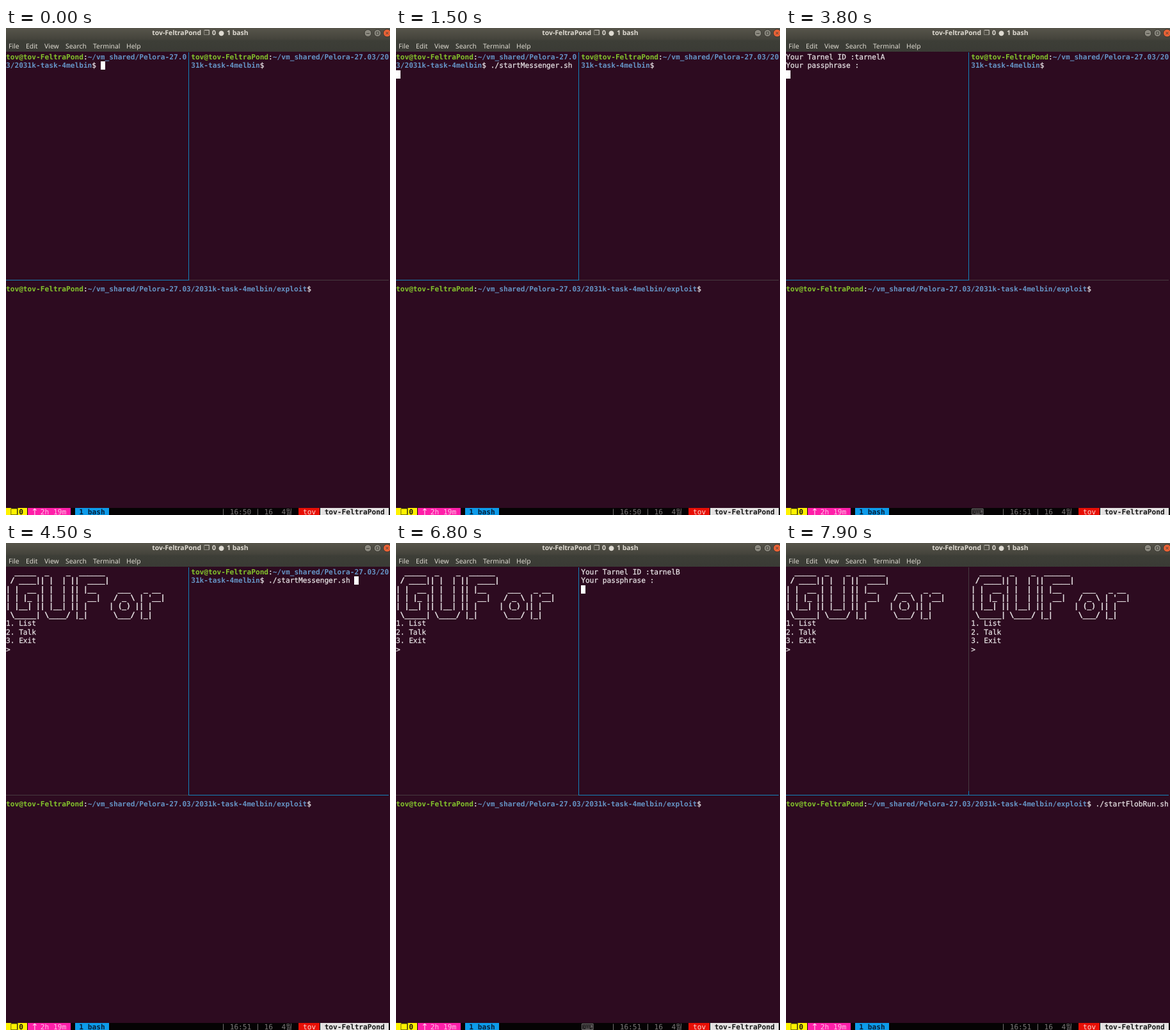
Recreate the animation shown at these times as an HTML page. Size 600x760 px, loop 8 s.

```html
<!DOCTYPE html>
<html lang="en">
<head>
<meta charset="utf-8">
<title>Terminal session</title>
<style>
  :root { --cw: 6.725px; --lh: 13.42px; --blue: #1482ba; --dim: #473a40; }
  html, body { margin: 0; width: 600px; height: 760px; overflow: hidden; }
  body {
    position: relative; background: #2d0b20; color: #e9e5e7;
    font: 11.17px/var(--lh) "DejaVu Sans Mono", "Noto Sans CJK KR", "DejaVu Sans", monospace;
    text-rendering: geometricPrecision;
  }
  body > *, #bar > *, #status > * { position: absolute; }
  #bar {
    left: 0; top: 0; width: 600px; height: 37px; color: #dfdbd2;
    background: linear-gradient(#57554b, #45443c 17px, #3d3e37 20px, #3a3b35);
    font: 10.4px/16px "Noto Sans", "DejaVu Sans", sans-serif; white-space: pre;
  }
  #bar > span { top: 21px; }
  #bar > b { top: 0; line-height: 17px; }
  #bar svg { left: 556px; top: 0; }
  .pane { white-space: break-spaces; line-break: anywhere; -webkit-text-stroke: .25px; }
  #left { left: 0; top: 38.8px; width: calc(42.2 * var(--cw)); }
  #right { left: calc(43 * var(--cw)); top: 38.8px; width: calc(46.2 * var(--cw)); }
  #bottom { left: 0; top: 401.1px; width: calc(89.2 * var(--cw)); }
  .user { color: #84c42c; font-weight: bold; -webkit-text-stroke: 0; }
  .path { color: #6593c4; font-weight: bold; -webkit-text-stroke: 0; }
  .banner { -webkit-text-stroke: .6px; }
  .cursor { background: #fff; }
  .v { left: 285px; width: 1px; }
  .h { top: 393px; height: 1px; }
  #status { left: 0; top: 749px; width: 600px; height: 11px; overflow: hidden; background: #050304; color: #7d7a7a; }
  #status > * {
    left: calc(var(--c) * var(--cw)); width: calc(var(--w) * var(--cw));
    top: 0; height: 14px; line-height: 14.6px; white-space: pre;
  }
  #status > .icon { font-family: "DejaVu Sans", sans-serif; font-size: 14px; }
</style>
</head>
<body>
<div id="bar">
  <b style="right:295px">tov-FeltraPond</b>
  <b style="left:309px">❐</b><b style="left:322px">0</b><b style="left:332px">●</b><b style="left:345px">1 bash</b>
  <span style="left:4px">File</span><span style="left:31px">Edit</span><span style="left:60px">View</span>
  <span style="left:93px">Search</span><span style="left:136px">Terminal</span><span style="left:188px">Help</span>
  <svg width="44" height="16" fill="none" stroke="#45443d">
    <g fill="#8b897f" stroke="#36352f"><circle cx="9.5" cy="8" r="5.5"/><circle cx="24.5" cy="8" r="5.5"/><circle cx="39.5" cy="8" r="6" fill="#ea6236"/></g>
    <path d="M7 8.5h5M22.5 6h4v4h-4zM37.5 6l4 4m0-4l-4 4"/>
  </svg>
</div>

<div id="left" class="pane"></div>
<div id="right" class="pane"></div>
<div id="bottom" class="pane"></div>

<div id="divider" class="v" style="top:38px;height:349px"></div>
<div class="v" style="top:387px;height:7px;background:var(--blue)"></div>
<div id="ruleLeft" class="h" style="left:0;width:285px"></div>
<div id="ruleRight" class="h" style="left:286px;width:312px"></div>

<div id="status">
  <i style="--c:0;--w:4.95;background:#fff200"></i>
  <i style="--c:5.05;--w:9.95;background:#ff1fa9"></i>
  <i style="--c:16;--w:8;background:#0d9bea"></i>
  <i style="--c:68;--w:4.9;background:#e80f06"></i>
  <i style="--c:73;--w:15.9;background:#e4e2e2"></i>
  <b class="icon" style="--c:1;--w:2;color:#111">❐</b><b style="--c:3;--w:1;color:#111">0</b>
  <span class="icon" style="--c:5.8;--w:1;color:#ffd0ec">↑</span><span style="--c:8;--w:6;color:#ffc4e8">2h 19m</span>
  <b style="--c:17;--w:6;color:#06203a">1 bash</b>
  <span id="prefix" class="icon" style="--c:43;--w:3">⌨</span>
  <span id="clock" style="--c:50;--w:12"></span>
  <span style="--c:64;--w:3">4월</span>
  <span style="--c:69;--w:3;color:#fbd9d6">tov</span>
  <b style="--c:74;--w:14;color:#151515">tov-FeltraPond</b>
</div>

<script>
const $ = id => document.getElementById(id);
const LOOP = 8000, KEY = 100;
const TO_RIGHT = 3900, TO_BOTTOM = 6900;

const banner = String.raw`  _____  _    _  ______
 / ____|| |  | ||  ____|
| |  __ | |  | || |__     ___   _ __
| | |_ || |  | ||  __|   / _ \ | '__|
| |__| || |__| || |     | (_) || |
 \_____| \____/ |_|      \___/ |_|`;
const menu = `<span class="banner">${banner}</span>\n1. List\n2. Talk\n3. Exit\n> `;

const prompt = (dir = "") =>
  `<span class="user">tov@tov-FeltraPond</span>:` +
  `<span class="path">~/vm_shared/Pelora-27.03/2031k-task-4melbin${dir}</span>$ `;

const typed = (text, start, t) => text.slice(0, Math.max(0, Math.floor((t - start) / KEY) + 1));

// Five keys are typed, then tab completes the command.
const command = (name, start, tab, t) => t < tab ? typed("./sta", start, t) : `./start${name}.sh `;

function login(s, t) {
  if (t >= s.menu) return menu;
  if (t < s.ask) return prompt() + command("Messenger", s.type, s.tab, t) + (t >= s.enter ? "\n" : "");
  let out = "Your Tarnel ID :" + typed(s.name, s.id, t);
  if (t >= s.pass) out += "\nYour passphrase :";
  if (t >= s.sent) out += "\n";
  return out;
}

const first = { name: "tarnelA", type: 600, tab: 1300, enter: 1800, ask: 1800, id: 2000, pass: 2800, sent: 3300, menu: TO_RIGHT };
const second = { name: "tarnelB", type: 4000, tab: 4500, enter: 4700, ask: 5000, id: 5200, pass: 6000, sent: 6400, menu: TO_BOTTOM };

function draw(t) {
  const focus = t < TO_RIGHT ? "left" : t < TO_BOTTOM ? "right" : "bottom";
  const panes = {
    left: login(first, t),
    right: login(second, t),
    bottom: prompt("/exploit") + command("FlobRun", 7000, 7500, t),
  };
  if (t < 7900) panes[focus] += '<span class="cursor"> </span>';
  for (const id in panes) $(id).innerHTML = panes[id];

  const line = (id, active) => $(id).style.background = `var(--${active ? "blue" : "dim"})`;
  line("divider", focus !== "bottom");
  line("ruleLeft", focus !== "right");
  line("ruleRight", focus !== "left");

  const prefix = (t >= 3800 && t < TO_RIGHT) || (t >= 6600 && t < TO_BOTTOM);
  $("prefix").style.visibility = prefix ? "visible" : "hidden";
  $("clock").textContent = `| 16:${t < 3300 ? 50 : 51} | 16`;
}

const origin = performance.now();
function tick() {
  draw((performance.now() - origin) % LOOP);
  requestAnimationFrame(tick);
}
tick();
</script>
</body>
</html>
```
